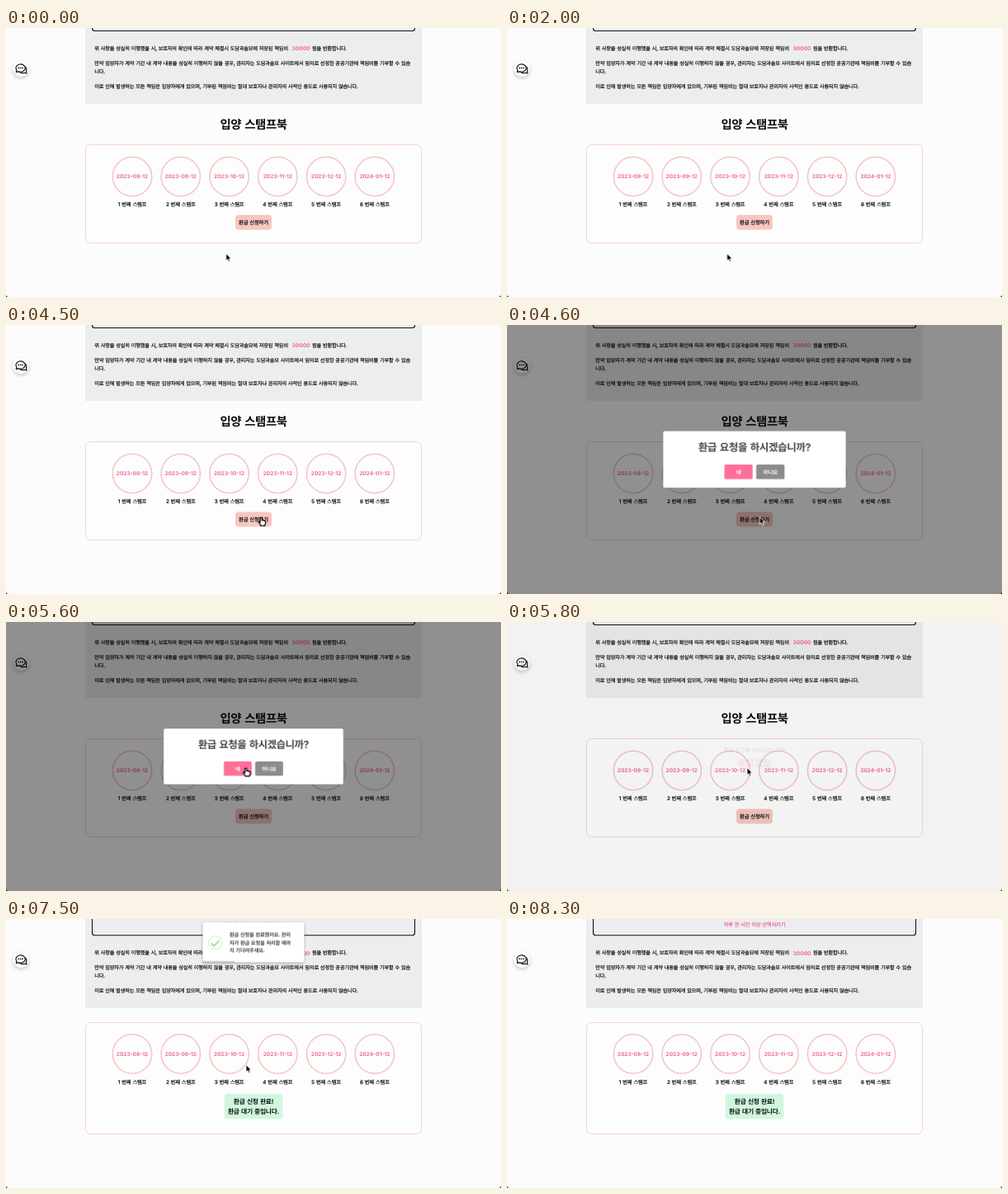
An HTML page for the animation above (9 s loop, 600 by 326 pixels).

```html
<!DOCTYPE html>
<html lang="ko">
<head>
<meta charset="utf-8">
<title>입양 스탬프북</title>
<style>
  html, body { margin: 0; width: 100%; height: 100%; overflow: hidden; background: #fcfcfc; }
  svg { display: block; width: 100%; height: 100%; }
  text {
    font-family: Inter, "Noto Sans CJK KR", "Noto Sans CJK", sans-serif;
    letter-spacing: -.029em; word-spacing: .08em; white-space: pre; text-rendering: geometricPrecision;
  }
  .num { letter-spacing: 0; }
  #chat > circle { filter: drop-shadow(0 2px 2px #0003); }
  #toast > rect:first-child { filter: drop-shadow(.5px 1px 1.6px #0005); }
</style>
</head>
<body>
<svg id="stage" viewBox="0 0 600 326" xmlns="http://www.w3.org/2000/svg"></svg>
<script>
const LOOP = 9000;
const INK = '#0c0c0c', PINK = '#ef6b95', PEACH = '#f7c6c1', DIALOG = '#444';

// Text is placed by the vertical centre of its line.
function label(x, cy, size, str, { fill = INK, bold = false, mid = false, cls = '' } = {}) {
  const stroke = bold ? '' : `stroke="${fill}" stroke-width=".18"`;
  return `<text class="${cls}" x="${x}" y="${cy + size * .37}" font-size="${size}" fill="${fill}" ${stroke}
    font-weight="${bold ? 700 : 500}" text-anchor="${mid ? 'middle' : 'start'}">${str}</text>`;
}

function box(x, y, w, h, r, fill, more = '') {
  return `<rect x="${x}" y="${y}" width="${w}" height="${h}" rx="${r}" fill="${fill}" ${more}/>`;
}

const centred = { bold: true, mid: true };
const pinkNum = { bold: true, fill: PINK, cls: 'num' };
const border = 'stroke="#f8d2cb" stroke-width="1"';

const terms = `<g id="terms">
  ${box(96, -40, 408, 132, 0, '#ecedef')}
  ${box(104.5, -60, 391, 63.5, 3, 'none', 'stroke="#111" stroke-width="1.1"')}
  ${label(300, -10, 6.3, '하루 한 시간 이상 산책시키기', { ...centred, fill: PINK })}
  ${label(107.2, 25, 6.2, '위 사항을 성실히 이행했을 시, 보호자의 확인에 따라 계약 체결시 도담과솔묘에 저장된 책임비')}
  ${label(346.5, 25, 6.6, '30000', pinkNum)}
  ${label(371, 25, 6.2, '원을 반환합니다.')}
  ${label(107.2, 43, 6.2, '만약 입양자가 계약 기간 내 계약 내용을 성실히 이행하지 않을 경우, 관리자는 도담과솔묘 사이트에서 임의로 선정한 공공기관에 책임비를 기부할 수 있습')}
  ${label(107.2, 53, 6.2, '니다.')}
  ${label(107.2, 71, 6.2, '이로 인해 발생하는 모든 책임은 입양자에게 있으며, 기부된 책임비는 절대 보호자나 관리자의 사적인 용도로 사용되지 않습니다.')}
</g>`;

const dates = ['2023-08-12', '2023-09-12', '2023-10-12', '2023-11-12', '2023-12-12', '2024-01-12'];
const stamps = dates.map((date, i) => {
  const x = 153 + i * 58.78;
  return `<circle cx="${x}" cy="180" r="23.7" fill="none" stroke="${PEACH}" stroke-width="1.6"/>
    ${label(x, 179.7, 6.5, date, { ...pinkNum, mid: true })}
    ${label(x, 214, 6.3, `${i + 1} 번째 스탬프`, { mid: true })}`;
}).join('');

const before = `<g id="before">
  ${label(300, 117, 14.4, '입양 스탬프북', centred)}
  ${box(96.5, 141.5, 407, 119, 6, '#fdfdfd', border)}
  ${box(278, 226.5, 44, 18, 4, PEACH)}
  ${label(300, 235.5, 6.4, '환급 신청하기', centred)}
</g>`;

const after = `<g id="after">
  ${box(96.5, 125.5, 407, 135, 6, '#fdfdfd', border)}
  ${box(264.7, 211.7, 70.6, 30.6, 4, '#d1f6df')}
  ${label(300, 221.3, 7.75, '환급 신청 완료!', centred)}
  ${label(300, 233, 7.75, '환급 대기 중입니다.', centred)}
</g>`;

const chat = `<g id="chat">
  <circle cx="18.2" cy="49.3" r="10" fill="#fdfdfd"/>
  <g fill="none" stroke="#111" stroke-width="1.2" stroke-linejoin="round" stroke-linecap="round">
    <path d="M12.3 53.4 L12.9 51.2 A5.7 4.7 0 1 1 15.4 52.9 Z"/>
    <path d="M23.7 47 Q25.6 49.6 24.4 52.4 L24.9 55 L22.4 54.2 Q19.6 55.2 17.2 53.8"/>
  </g>
  ${[15.2, 17.6, 20].map(x => `<circle cx="${x}" cy="48.3" r=".85" fill="#111"/>`).join('')}
</g>`;

const corners = `<path d="M0 326v-3.5q0 3.5 3.5 3.5zM600 326v-3.5q0 3.5-3.5 3.5z" fill="#222"/>`;

const modal = `<g transform="translate(300 163)"><g id="modal">
  ${box(-108.8, -33.7, 217.6, 67.4, 1.7, '#fff')}
  ${label(0, -14.3, 12.3, '환급 요청을 하시겠습니까?', { ...centred, fill: DIALOG })}
  ${box(-36, 6, 33.8, 17.4, 1.8, '#ff6f98')}
  ${box(2, 6, 33.8, 17.4, 1.8, '#8c8c8c')}
  ${label(-19.1, 14.7, 6.4, '네', { ...centred, fill: '#fff' })}
  ${label(18.9, 14.7, 6.4, '아니요', { ...centred, fill: '#fff' })}
</g></g>`;

const note = ['환급 신청을 완료했어요. 관리', '자가 환급 요청을 처리할 때까', '지 기다려주세요.'];
const toast = `<g transform="translate(300 28.3)"><g id="toast">
  ${box(-61.5, -24.3, 123, 48.6, 1.7, '#fff')}
  <g transform="translate(-61.5 23.6)"><g id="bar">${box(0, -.8, 123, 1.5, 0, '#000', 'opacity=".25"')}</g></g>
  ${note.map((s, i) => label(-29, -9.5 + i * 9.7, 6.25, s, { bold: true, fill: DIALOG })).join('')}
  <g transform="translate(-46.3 .4)" fill="none" stroke="#a5dc86" stroke-width="1.9">
    <circle r="8" stroke-opacity=".3" stroke-width="1.7"/>
    <path id="tip" d="M0 0H1"/>
    <path id="long" d="M0 0H1"/>
  </g>
</g></g>`;

const cursor = `<g id="cursor">
  <path id="arrow" d="M0 0V8.8L2 7L3.4 10.1L5 9.4L3.7 6.4H6.4Z" fill="#000" stroke="#fff" stroke-width=".9"/>
  <path id="hand" d="M.2 0Q1.3 0 1.3 1.1V3.4Q2.6 2.9 2.9 3.8Q4 3.4 4.4 4.3Q5.9 4.1 5.9 5.6Q5.9 7.6 4.8 8.6V9.8H-.3Q-.6 8.6 -2.6 6Q-3 4.9 -2 4.9L-.9 5.7V1.1Q-.9 0 .2 0Z"
    fill="#fff" stroke="#000" stroke-width="1.2"/>
</g>`;

document.getElementById('stage').innerHTML =
  terms + before + after + `<g id="stamps">${stamps}</g>` + chat + corners +
  `<rect id="shade" width="600" height="326" fill-opacity=".43"/>` + modal + toast + cursor;

// steps: [time, properties, easing towards the next step]
function play(id, steps) {
  const last = steps[steps.length - 1];
  const all = [[0, steps[0][1], 'step-end'], ...steps.filter(s => s[0] > 0), [LOOP, last[1]]];
  if (steps[0][0] === 0) all[0] = steps[0];
  document.getElementById(id).animate(
    all.map(([t, props, easing = 'linear']) => ({ ...props, offset: t / LOOP, easing })),
    { duration: LOOP, iterations: Infinity });
}

const move = (id, steps) => play(id, steps.map(([t, transform, e]) => [t, { transform }, e]));
const fade = (id, steps) => play(id, steps.map(([t, opacity, e]) => [t, { opacity }, e]));
const at = (x, y) => `translate(${x}px, ${y}px)`;
const hard = 'step-end';

// Page switch
const DONE = 6000;
fade('before', [[0, 1, hard], [DONE, 0, hard]]);
fade('after', [[0, 0, hard], [DONE, 1, hard]]);
move('terms', [[0, at(0, 0), hard], [DONE, at(0, 16.2), hard]]);
move('stamps', [[0, at(0, 0), hard], [DONE, at(0, -16.5), hard]]);

// Dialog
const OPEN = 4516, CLOSE = 5705;
fade('shade', [[0, 0, hard], [OPEN, 0], [OPEN + 80, 1], [CLOSE, 1, 'ease'], [CLOSE + 150, 0]]);
fade('modal', [[0, 0, hard], [OPEN, 1], [CLOSE, 1, 'ease'], [CLOSE + 150, 0]]);
move('modal', [
  [OPEN, 'scale(.7)', 'ease'], [OPEN + 135, 'scale(1.05)', 'ease'], [OPEN + 240, 'scale(.95)', 'ease'],
  [OPEN + 300, 'scale(1)'], [CLOSE, 'scale(1)', 'ease'], [CLOSE + 150, 'scale(.5)']
]);

// Toast
const HIDE = 8190;
fade('toast', [[0, 0, hard], [DONE, 1], [HIDE, 1, 'ease'], [HIDE + 100, 0]]);
move('toast', [
  [DONE, 'translateY(-4.2px) rotate(2deg)', 'ease'], [DONE + 165, 'translateY(0px) rotate(-2deg)', 'ease'],
  [DONE + 330, 'translateY(2.1px) rotate(2deg)', 'ease'], [DONE + 500, 'translateY(0px) rotate(0deg)'],
  [HIDE, 'translateY(0px) rotate(0deg)', 'ease'], [HIDE + 100, 'translateY(0px) rotate(1deg)']
]);
move('bar', [[DONE + 10, 'scaleX(1)'], [HIDE, 'scaleX(0)']]);

const stroke = (x, y, deg, len) => `${at(x, y)} rotate(${deg}deg) scaleX(${len})`;
move('tip', [
  [DONE + 405, stroke(-8, -5, 45, 0), 'ease'], [DONE + 525, stroke(-7.2, -5, 45, 10.5), 'ease'],
  [DONE + 630, stroke(-3.6, 2, 45, 3.5), 'ease'], [DONE + 750, stroke(-5, .8, 45, 5.2)]
]);
move('long', [
  [DONE + 488, stroke(-1.8, 4.2, -45, 0), 'ease'], [DONE + 630, stroke(-1.8, 4.2, -45, 8), 'ease'],
  [DONE + 750, stroke(-1.8, 4.2, -45, 9.6)]
]);

// Pointer
move('cursor', [
  [3720, at(266.6, 273.2), 'ease-in-out'], [4190, at(309, 233.3)], [4500, at(309, 233.3)],
  [4590, at(306.2, 232.6)], [4700, at(306, 232.4), 'ease-in-out'], [5400, at(290.4, 177)],
  [5600, at(290.4, 177)], [5700, at(291, 176.6)], [8000, at(291, 176.6), 'ease-in'], [8250, at(300, -14)]
]);
const overs = [[4080, 4510], [5150, CLOSE]];
fade('hand', [[0, 0, hard], ...overs.flatMap(([a, b]) => [[a, 1, hard], [b, 0, hard]])]);
fade('arrow', [[0, 1, hard], ...overs.flatMap(([a, b]) => [[a, 0, hard], [b, 1, hard]])]);
</script>
</body>
</html>
```
